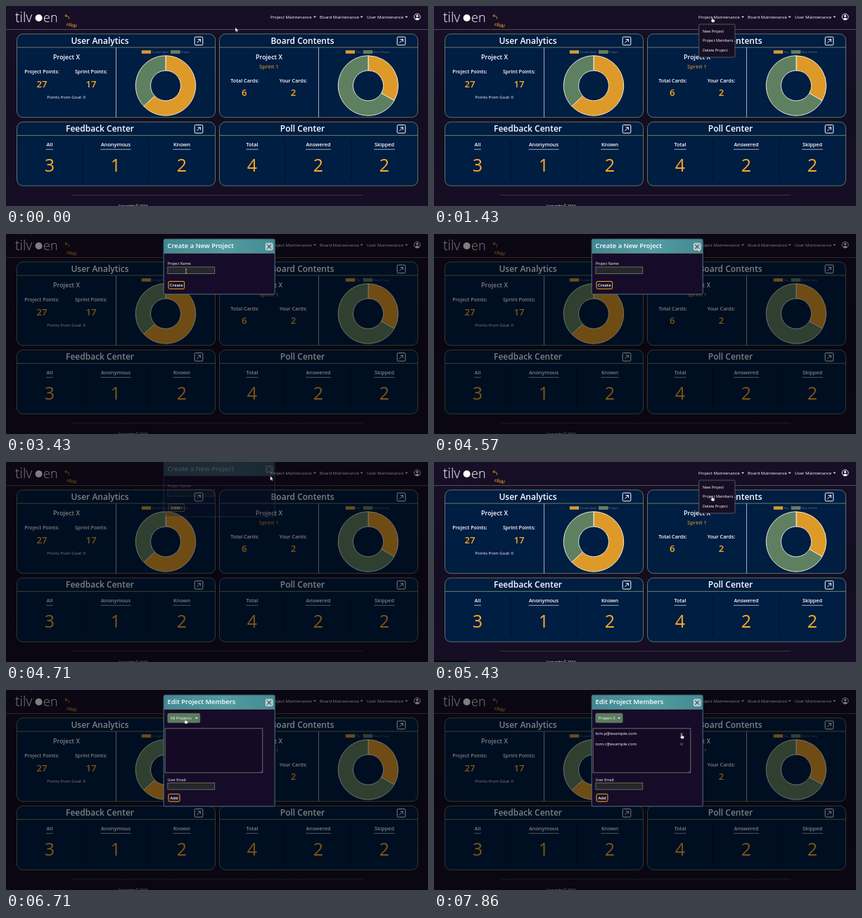
Animation, 600 px wide and 285 px high, one loop 8 s. Source, as an HTML page:

```html
<!DOCTYPE html>
<html lang="en">
<head>
<meta charset="utf-8">
<title>Project dashboard</title>
<style>
  html, body { margin: 0; width: 100%; height: 100%; overflow: hidden; background: #120c20; }
  svg { display: block; width: 100%; height: 100%; }
  text { font-family: "Open Sans", "Noto Sans", sans-serif; white-space: pre; }
  .legend { font-family: "Liberation Sans", sans-serif; }
</style>
</head>
<body>
<svg id="stage" viewBox="0 0 600 285" preserveAspectRatio="none"></svg>
<script>
const LOOP = 8000, STEP = LOOP / 56;
const ORANGE = '#dd9a28', GOLD = '#f9ac27', GREEN = '#5f8060', WHITE = '#fff';

const text = (x, y, str, size, { w = 400, fill = WHITE, at = 'start', extra = '' } = {}) =>
  `<text x="${x}" y="${y}" font-size="${size}" font-weight="${w}" fill="${fill}" text-anchor="${at}" ${extra}>${str}</text>`;
const mid = (x, y, str, size, w = 600, fill = WHITE) => text(x, y, str, size, { w, fill, at: 'middle' });
const rect = (x, y, w, h, fill, stroke = 'none', r = 0, sw = 0.8) =>
  `<rect x="${x}" y="${y}" width="${w}" height="${h}" rx="${r}" fill="${fill}" stroke="${stroke}" stroke-width="${sw}"/>`;
const path = (d, stroke, sw = 0.8, fill = 'none') =>
  `<path d="${d}" stroke="${stroke}" stroke-width="${sw}" fill="${fill}"/>`;
const group = (id, body, attrs = '') => `<g id="${id}" ${attrs}>${body}</g>`;
const caret = (x, y) => path(`M${x} ${y}h4l-2 2z`, 'none', 0, WHITE);

function card(x, y, h, title) {
  const ix = x + 252.7, iy = y + 4.3;
  return rect(x, y, 282, h, '#001d42', '#63806f', 8.5, 0.9) +
    path(`M${x} ${y + 19.2}h282`, '#8a9a72') +
    mid(x + 118, y + 13.8, title, 12) +
    rect(ix, iy, 11.6, 11.6, 'none', WHITE, 1.2, 1) +
    path(`M${ix + 3.2} ${iy + 8.4}l5-5m-3.8 0h3.8v3.8`, WHITE, 1);
}

function donut(cx, share) {
  const cy = 113.5, R = 42.7, r = 21.5;
  const at = (rad, f) => {
    const a = f * 2 * Math.PI;
    return `${cx + rad * Math.sin(a)} ${cy - rad * Math.cos(a)}`;
  };
  const slice = (a, b, fill) => {
    const big = +(b - a > 0.5);
    return path(`M${at(R, a)}A${R} ${R} 0 ${big} 1 ${at(R, b)}L${at(r, b)}A${r} ${r} 0 ${big} 0 ${at(r, a)}Z`, '#f4f4ee', 0.9, fill);
  };
  return slice(0, share, ORANGE) + slice(share, 1, GREEN);
}

function legend(x, first, x2, second) {
  const item = (px, label, fill) => rect(px, 63.2, 13, 4.6, fill, '#8f8f78', 0, 0.4) +
    text(px + 14.6, 67, label, 3.8, { fill: '#747a80', extra: 'class="legend"' });
  return item(x, first, ORANGE) + item(x2, second, GREEN);
}

const points = (x, label, value) => mid(x, 96.3, label, 7.15);

function counters(x, labels, values) {
  return labels.map((label, i) => {
    const cx = x + [46.5, 140.5, 234.5][i], half = [5, 21.6, 12.6][i];
    const hw = label === 'Total' ? 8.6 : label === 'Answered' ? 18 : label === 'Skipped' ? 14.8 : half;
    return mid(cx, 200.4, label, 7.3) +
      path(`M${cx - hw} 204.3h${hw * 2}`, '#e4e6ea', 0.7) +
      mid(cx, 235.6, values[i], 25, 400, GOLD) +
      (i ? path(`M${cx - 47} 191v58`, '#00102a', 0.9) : '');
  }).join('');
}

const nav = [[376, 'Project', 437], [446, 'Board', 503.6], [513, 'User', 567.4]]
  .map(([x, name, c]) => text(x, 18, name + ' Maintenance', 6.15) + caret(c, 14.8)).join('');

const page = rect(0, 0, 600, 285, 'url(#night)') +
  path('M0 33.5H600', '#6d6872', 0.7) +
  text(13, 22.5, 'tilv', 19.5, { w: 300 }) +
  '<circle cx="46.6" cy="17" r="5" fill="#fff"/>' +
  text(53, 22.5, 'en', 18, { w: 300 }) +
  path('M89.3 18.6q1.4-4.8-5.2-4.8m2.2-2l-2.4 2 2.1 2', GOLD, 0.8) +
  text(85.8, 27.8, 'click!', 6.4, { w: 600, fill: GOLD, extra: 'font-style="italic" transform="rotate(13 86 28)"' }) +
  nav +
  '<circle cx="584.7" cy="15.5" r="4.4" fill="none" stroke="#fff" stroke-width=".9"/><circle cx="584.7" cy="14.2" r="1.6" fill="#fff"/>' +
  path('M581.6 18.4q3.1-3.4 6.2 0q-3.1 2.6-6.2 0', 'none', 0, WHITE) +

  card(15.5, 39.8, 118.9, 'User Analytics') +
  path('M156.5 59V158.7', '#b4bfca', 0.9) +
  mid(86, 76.4, 'Project X', 8.9) +
  points(51, 'Project Points:') + points(121, 'Sprint Points:') +
  mid(51, 115.8, '27', 13.2, 600, GOLD) + mid(121, 115.8, '17', 13.2, 600, GOLD) +
  mid(85.7, 132.3, 'Points from Goal: 0', 6.15, 400) +
  legend(193, 'Current Sprint', 234.3, 'Project') + donut(227, 17 / 27) +

  card(303.5, 39.8, 118.9, 'Board Contents') +
  path('M444.5 59V158.7', '#b4bfca', 0.9) +
  mid(374, 76.4, 'Project X', 8.9) +
  mid(374, 89.2, 'Sprint 1', 7.7, 500, GOLD) +
  mid(339.5, 108.6, 'Total Cards:', 7.2) + mid(408.5, 108.6, 'Your Cards:', 7.2) +
  mid(338.7, 127.8, '6', 13.2, 600, GOLD) + mid(408.5, 127.8, '2', 13.2, 600, GOLD) +
  legend(483, 'You', 508, 'Rest of Team') + donut(515, 1 / 3) +

  card(15.5, 165.2, 91, 'Feedback Center') +
  counters(15.5, ['All', 'Anonymous', 'Known'], [3, 1, 2]) +
  card(303.5, 165.2, 91, 'Poll Center') +
  counters(303.5, ['Total', 'Answered', 'Skipped'], [4, 2, 2]) +
  path('M94 269.5H507', '#4b4650', 0.7) +
  text(160, 286.6, 'Copyright © 2024', 5.1);

const menu = rect(376.7, 26, 51.3, 47, '#160f24', '#77727c', 1.6, 0.7) +
  ['New Project', 'Project Members', 'Delete Project']
    .map((s, i) => text(382, 37.8 + 13.6 * i, s, 5.45)).join('');

const cross = (x, y, r, color, sw) => path(`M${x - r} ${y - r}l${2 * r} ${2 * r}m0 ${-2 * r}l${-2 * r} ${2 * r}`, color, sw);
const field = y => rect(229.9, y, 66.8, 9.6, '#25272c', '#74806a', 0, 0.8);
const button = (y, w, label) => rect(231, y, w, 10.7, '#1a1026', GOLD, 1.6, 1) +
  mid(231 + w / 2, y + 7.5, label, 5.8);
const caption = (y, s) => text(229.7, y, s, 5.15, { w: 500 });
const dialog = (h, title, body) =>
  rect(224.2, 7.2, 158, h, '#160c29', '#527f8a', 2, 0.9) +
  path('M224.5 27.3V9q0-1.5 1.5-1.5h154.4q1.5 0 1.5 1.5v18.3z', 'none', 0, 'url(#teal)') +
  path('M224.2 27.4h158', '#87a08b', 0.6) +
  text(229.5, 20.4, title, 9.4, { w: 600 }) +
  rect(369.4, 13.2, 9.6, 9.6, '#a8c5c8', '#e3ecec', 1.4, 0.8) + cross(374.2, 18, 3, '#1b2a30', 1) +
  body;

const toggle = (id, w, label) => group(id, rect(229.8, 33.3, w, 13.3, '#5a7d5d', '#6f9070', 1.8, 0.5) +
  text(233.7, 42.1, label, 5.9) + caret(230 + w - 7.2, 39.2));

const createDialog = dialog(78.6, 'Create a New Project',
  caption(43.8, 'Project Name:') + field(47) + button(67.5, 22.6, 'Create'));

const membersDialog = dialog(158.6, 'Edit Project Members',
  toggle('allProjects', 46, 'All Projects') + toggle('projectX', 38.4, 'Project X') +
  rect(226.2, 54.8, 138.6, 63, '#140a26', '#7e8672', 0, 0.8) +
  group('members', text(229.8, 64.2, 'kim.p@example.com', 6, { w: 500 }) +
    text(229.8, 79, 'tom.r@example.com', 6, { w: 500 }) +
    cross(352, 62.5, 1.9, '#a9782c', 0.8) + cross(352, 77.2, 1.9, '#b57a1f', 0.8)) +
  path('M361.6 117l2.4-2.4m-1 2.4l1-1', '#8d9385', 0.4) +
  caption(129.8, 'User Email:') + field(132.3) + button(148.2, 16, 'Add'));

const pointers = {
  arrow: path('M0 0v6.2l1.5-1.3 1 2.2 1-.5-1-2.1h2z', '#222', 0.4, WHITE),
  hand: path('M-.7 0q.7-.8 1.3 0v2.6l2.4.7q.8.4.5 1.5l-.6 2.3h-3l-2.1-2.6q0-1 1.5-.3z', '#222', 0.4, WHITE),
  beam: path('M-1.2-3h2.4m-1.2 0v6m-1.2 0h2.4', '#c4c4c4', 0.7)
};

document.getElementById('stage').innerHTML = `<defs>
  <linearGradient id="night" x2="0" y2="1"><stop stop-color="#170f26"/><stop offset=".5" stop-color="#130d22"/><stop offset="1" stop-color="#150e24"/></linearGradient>
  <linearGradient id="teal"><stop stop-color="#438892"/><stop offset=".55" stop-color="#529ca2"/><stop offset="1" stop-color="#438a92"/></linearGradient>
  </defs>` + page + group('menu', menu) + group('status', rect(0, 283, 48, 2, '#050408')) +
  group('shade', rect(0, 0, 600, 285, '#000')) +
  group('create', createDialog) + group('edit', membersDialog) +
  group('cursor', Object.entries(pointers).map(([id, d]) => group(id, d)).join(''));

const el = id => document.getElementById(id);
const clamp = v => Math.min(1, Math.max(0, v));
const show = (id, on) => el(id).setAttribute('visibility', on ? 'inherit' : 'hidden');
const within = (t, a, b) => t >= a && t < b;

// time, x, y, pointer shape from that time on
const route = [
  [0, 326, 30.5, 'arrow'], [500, 328, 29, 'arrow'], [1250, 396, 16, 'hand'], [1900, 394, 17, 'hand'],
  [2500, 390, 35, 'hand'], [2860, 390, 35, 'hand'], [3000, 372, 39, 'arrow'], [3350, 256, 53, 'beam'],
  [3750, 256, 53, 'arrow'], [4250, 374, 18, 'arrow'], [4570, 375.7, 20, 'arrow'],
  [4850, 398, 16, 'hand'], [5080, 397, 17, 'hand'], [5400, 395.5, 48.5, 'hand'], [5560, 395, 49, 'arrow'],
  [5710, 383, 50, 'arrow'], [6250, 255, 41, 'hand'], [6700, 255, 41, 'hand'], [6950, 248, 54, 'hand'],
  [7150, 248, 54, 'arrow'], [7700, 352, 62.5, 'hand'], [8000, 352, 62.5, 'hand']
];

function placeCursor(t) {
  const i = route.findIndex((p, n) => n && t < p[0]);
  const [t0, x0, y0, shape] = route[i - 1], [t1, x1, y1] = route[i];
  const p = (t - t0) / (t1 - t0), e = p * p * (3 - 2 * p);
  el('cursor').setAttribute('transform', `translate(${x0 + (x1 - x0) * e} ${y0 + (y1 - y0) * e})`);
  for (const id in pointers) show(id, id === shape);
}

function placeDialog(id, t, open, close) {
  const rise = clamp((t - open) / 300), leave = clamp((t - close) / 300);
  const shift = -20.8 * ((1 - rise) ** 2 + leave);
  el(id).setAttribute('transform', `translate(0 ${shift})`);
  el(id).setAttribute('opacity', clamp((t - open) / 150) * (1 - clamp((t - close) / 150)));
}

const shadeAt = (t, on, off) => clamp((t - on) / 130) * (1 - clamp((t - off) / 150));

function draw(now) {
  const t = Math.floor((now % LOOP) / STEP + 1e-6) * STEP;
  placeCursor(t);
  show('menu', within(t, 1420, 2900) || within(t, 4990, 5500));
  show('status', within(t, 2280, 3000) || within(t, 5130, 5850));
  el('shade').setAttribute('opacity', 0.5 * Math.max(shadeAt(t, 2870, 4730), shadeAt(t, 5450, LOOP + 1)));
  placeDialog('create', t, 3000, 4460);
  placeDialog('edit', t, 5584, LOOP + 1);
  const chosen = t >= 7130;
  show('allProjects', !chosen);
  show('projectX', chosen);
  show('members', chosen);
}

const start = performance.now();
(function tick() {
  draw(performance.now() - start);
  requestAnimationFrame(tick);
})();
</script>
</body>
</html>
```
